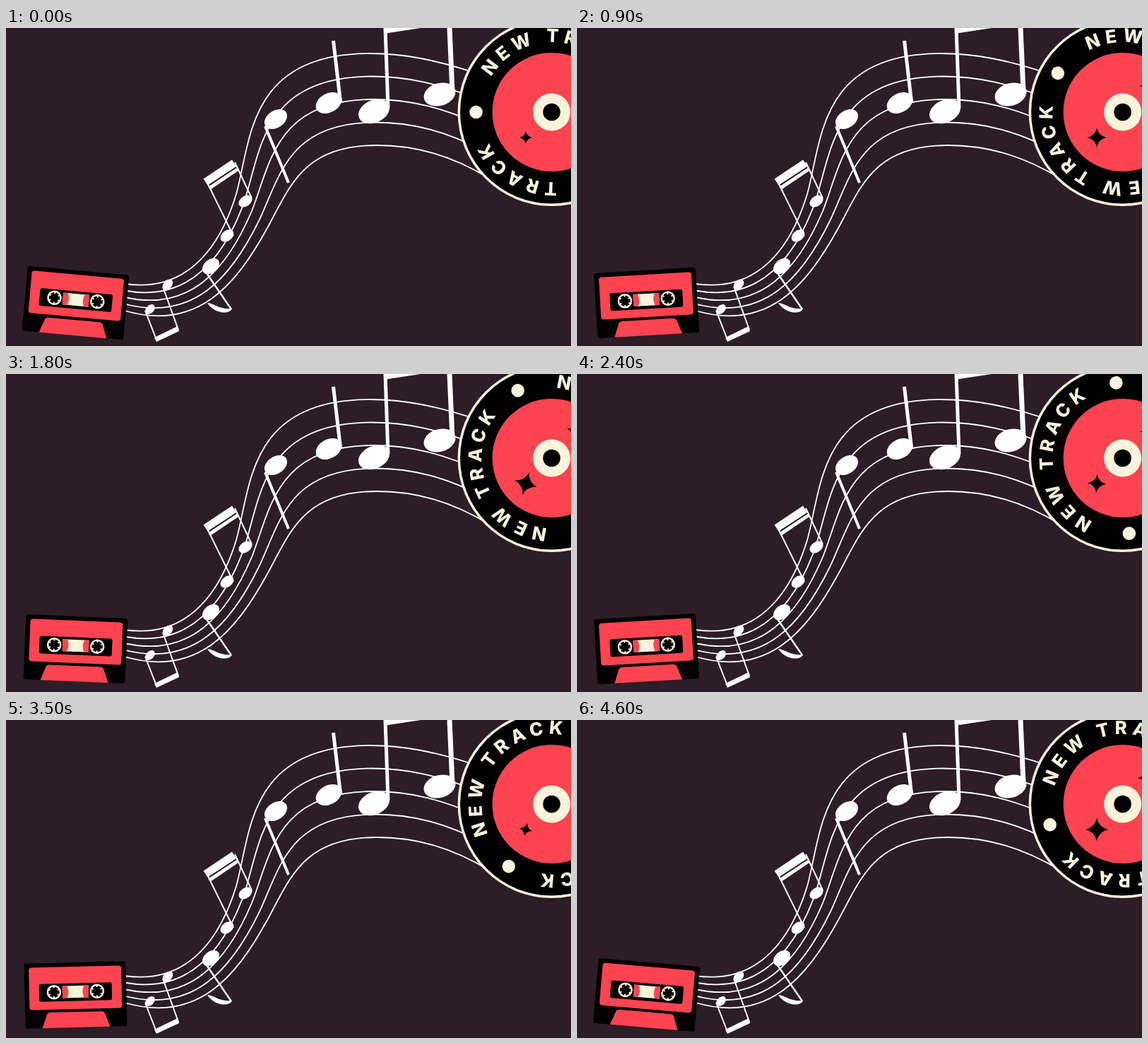
Write an HTML page that moves like this. It is 800 px wide and 450 px high and loops after 4.7 s.

```html
<!DOCTYPE html>
<html lang="en">
<head>
<meta charset="utf-8">
<title>New track</title>
<style>
  html, body { margin: 0; width: 100%; height: 100%; overflow: hidden; background: #2c1d26; }
  svg { display: block; width: 800px; height: 450px; }
  .red { fill: #fd4450; }
  .cream { fill: #fcf4da; }
  text { font: 800 26px Inter, Arial, sans-serif; letter-spacing: 6.6px; text-anchor: middle; }
</style>
</head>
<body>
<svg viewBox="0 0 800 450">
  <defs><path id="ring" d="M0 99A99 99 0 0 1 0 -99A99 99 0 0 1 0 99"/></defs>
  <rect width="800" height="450" fill="#2c1d26"/>

  <g id="staff" fill="none" stroke="#fff" stroke-width="1.8"></g>
  <g id="heads" fill="#fff"></g>
  <g fill="none" stroke="#fff">
    <path stroke-width="2" d="M197 400L213 441M222 366L244 427M283 215L322 294M324 190L348 241"/>
    <path stroke-width="2.4" d="M282 344L319 398"/>
    <path stroke-width="4" d="M367 139L400 219"/>
    <path stroke-width="5" d="M463.500 18L473.500 104M537 0L541 113"/>
    <path stroke-width="7" d="M628 0L632 90"/>
  </g>
  <g fill="#fff">
    <path d="M210 438L243 422L245 429L213 444Z"/>
    <path d="M320 397C318 405 296 406 285 389C296 390 302 399 320 397Z"/>
    <path d="M279.500 213.500L320 186.500L326 196L285.500 222.500Z"/>
    <path d="M286.500 224.500L326.500 198L329 202L289 229Z"/>
    <path d="M535 -20V8L633 -7V-30Z"/>
  </g>

  <g id="tape">
    <rect x="-72" y="-46" width="144" height="92" rx="3"/>
    <rect class="red" x="-65.500" y="-40" width="131" height="60" rx="4"/>
    <rect x="-51.500" y="-16.500" width="103" height="25" rx="3"/>
    <rect class="cream" x="-18.500" y="-13" width="37" height="17"/>
    <path class="red" d="M-18.500 -13H-12Q-8 -4.500 -12 4H-18.500ZM18.500 -13H12Q8 -4.500 12 4H18.500Z"/>
    <path class="red" d="M-36 24H36Q40 24 41.500 28L48 46H-48L-41.500 28Q-40 24 -36 24Z"/>
    <g id="reels"></g>
  </g>

  <g transform="translate(772.600 119)">
    <circle class="cream" r="133"/>
    <circle r="129.500"/>
    <g id="label" class="cream"></g>
    <circle class="red" r="84"/>
    <circle class="cream" r="26.500"/>
    <circle r="12.300"/>
  </g>
  <path class="star" data-at="736 155"/>
  <path class="star" data-at="810 82"/>
</svg>
<script>
const $ = id => document.getElementById(id);

function add(parent, tag, attrs, text = '') {
  const el = document.createElementNS('http://www.w3.org/2000/svg', tag);
  for (const key in attrs) el.setAttribute(key, attrs[key]);
  el.textContent = text;
  return parent.appendChild(el);
}

// Five staff lines, blended from the top one to the bottom one.
const top5 = [168, 362, 250, 374, 300, 320, 326, 235, 347, 160, 342, 36, 515, 36, 565, 36, 610, 46, 660, 62];
const low5 = [168, 400, 270, 430, 325, 365, 370, 283, 402, 225, 420, 166, 525, 166, 580, 166, 630, 180, 685, 213];
for (let i = 0; i < 5; i++) {
  const [x, y, ...rest] = top5.map((v, n) => v + (low5[n] - v) * i / 4);
  add($('staff'), 'path', { d: `M${x} ${y}C${rest.join(' ')}` });
}

// Note heads (x, y, radius) lean less towards the right.
const heads = [
  [204, 398, 8], [229, 363, 8.5], [290, 337, 13.5], [313, 294, 10.5], [339, 245, 10.5],
  [382, 129, 17.5], [457, 106, 19.5], [521, 118, 23], [614, 94, 23]
];
for (const [x, y, r] of heads)
  add($('heads'), 'ellipse', {
    rx: r, ry: r * 0.69, transform: `translate(${x} ${y}) rotate(${(x - 204) * 0.07 - 46})`
  });

for (const x of [-30.5, 30.5]) {
  const reel = add($('reels'), 'g', { transform: `translate(${x} -4.500)` });
  add(reel, 'circle', { r: 10.3, class: 'cream' });
  add(reel, 'circle', { r: 7.8 });
  for (let i = 0; i < 6; i++)
    add(reel, 'rect', { x: -1, y: -8, width: 2, height: 2.2, class: 'cream', transform: `rotate(${i * 60})` });
}

for (const half of [0, 180]) {
  const side = add($('label'), 'g', { transform: `rotate(${half})` });
  add(side, 'circle', { cx: -107, r: 9.3 });
  const line = add(side, 'text', { transform: 'rotate(4)' });
  add(line, 'textPath', { href: '#ring', startOffset: '50%' }, 'NEW TRACK');
}

const stars = document.querySelectorAll('.star');
for (const star of stars)
  star.setAttribute('d', 'M0 -1Q.18 -.18 1 0Q.18 .18 0 1Q-.18 .18 -1 0Q-.18 -.18 0 -1Z');

const LOOP = 4700, STEP = 100;
const wave = (t, period) => Math.cos(t / period * 2 * Math.PI);

function draw(t) {
  const spin = Math.max(0, t * 0.036 - 1.4);
  $('label').setAttribute('transform', `rotate(${spin})`);

  const sway = 0.6 + 4.6 * wave(t - 20, 1500);
  $('tape').setAttribute('transform', `translate(98.500 389) rotate(${sway})`);

  const size = 12.8 - 3.9 * wave(t, 3250);
  const turn = 9 * (1 + wave(t - 100, 1700)) * Math.sin(Math.PI * t / LOOP);
  for (const star of stars)
    star.setAttribute('transform', `translate(${star.dataset.at}) rotate(${turn}) scale(${size})`);
}

const start = performance.now();
function tick() {
  const t = (performance.now() - start) % LOOP;
  draw(Math.floor(t / STEP) * STEP);
  requestAnimationFrame(tick);
}
draw(0);
requestAnimationFrame(tick);
</script>
</body>
</html>
```
